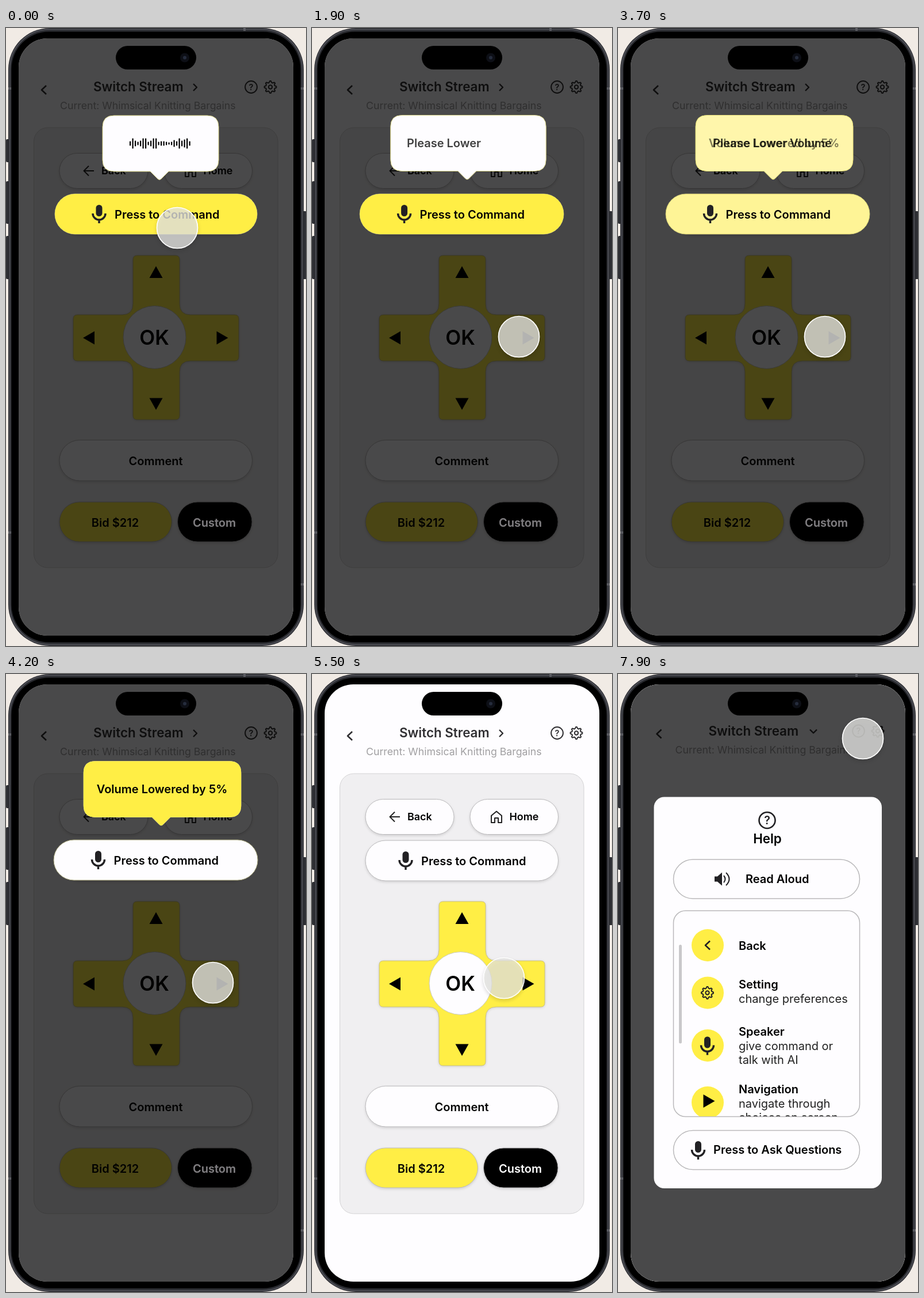
An HTML page that plays this animation: 522 px wide and 1073 px high, repeating every 8000 ms.

```html
<!DOCTYPE html>
<html lang="en">
<head>
<meta charset="utf-8">
<title>Remote control</title>
<style>
  html, body { margin: 0; width: 100%; height: 100%; overflow: hidden; background: #f1ebe5; }
  svg { display: block; width: 522px; height: 1073px; font-family: Inter, sans-serif; }
  .pill { fill: #fefdff; stroke: #bab9bb; filter: drop-shadow(0 2px 2px rgba(0, 0, 0, .13)); }
  .line { fill: none; stroke: currentColor; stroke-width: 2; stroke-linejoin: round; }
  .plain { fill: #fefdff; stroke: #bab9bb; stroke-width: 1.5; }
  #cursor { filter: drop-shadow(0 3px 3px rgba(0, 0, 0, .18)); }
</style>
</head>
<body>
<svg id="stage" viewBox="0 0 522 1073"></svg>
<script>
const YELLOW = '#ffee45', WHITE = '#fefdff', LOOP = 8000, STEP = 100;
const stage = document.getElementById('stage');

const text = (x, y, str, size = 20, weight = 600, more = '') =>
  `<text x="${x}" y="${y}" font-size="${size}" font-weight="${weight}" ${more}>${str}</text>`;
const centered = (x, y, str, size = 20, more = '') =>
  text(x, y, str, size, 600, `text-anchor="middle" ${more}`);
const rect = (l, t, r, b, radius, more = '') =>
  `<rect x="${l}" y="${t}" width="${r - l}" height="${b - t}" rx="${radius}" ${more}/>`;
const pill = (l, t, r, b, more = 'class="pill"') => rect(l, t, r, b, (b - t) / 2, more);
const circle = (x, y, r, more = '') => `<circle cx="${x}" cy="${y}" r="${r}" ${more}/>`;
const path = (d, more = 'class="line"') => `<path d="${d}" ${more}/>`;
const group = (id, body, more = '') => `<g id="${id}" ${more}>${body}</g>`;

function gear(x, y, r) {
  const points = [];
  for (let i = 0; i < 32; i++) {
    const a = (i - .5) * Math.PI / 16;
    const d = i % 4 < 2 ? r : r * .76;
    points.push(`${(x + d * Math.sin(a)).toFixed(1)},${(y - d * Math.cos(a)).toFixed(1)}`);
  }
  return `<polygon class="line" points="${points.join(' ')}"/>` + circle(x, y, r * .3, 'class="line"');
}

const mic = (x, y) =>
  rect(x - 5.5, y - 16, x + 5.5, y + 4, 5.5, 'fill="#222124"') +
  path(`M${x - 11} ${y - 1}a11 11 0 0 0 22 0M${x} ${y + 10}v6`,
    'fill="none" stroke="#222124" stroke-width="3.4"');

const question = (x, y, r) =>
  circle(x, y, r, `class="line" style="stroke-width:${r * .19}"`) +
  centered(x, y + r * .5, '?', r * 1.4, 'fill="currentColor"');

function header(x, y, arrow, iconX) {
  return `<g color="#302f32">
    ${path(`M${x + 10} ${y + 97}l-8 7.5 8 7.5`, 'class="line" style="stroke-width:2.6"')}
    ${text(x + 92, y + 107, 'Switch Stream', 22.4, 600, 'fill="#302f32"')}
    ${path(arrow, 'class="line" style="stroke-width:2.4"')}
    ${text(x + 34, y + 138, 'Current: Whimsical Knitting Bargains', 17.7, 400, 'fill="#a09fa1"')}
    ${question(iconX, y + 99.5, 10.4)}${gear(iconX + 33.5, y + 99.5, 10.5)}
  </g>`;
}

const dpad = () => path(
  'M228 395H295q7 0 7 7V479q0 19 19 19H398q7 0 7 7V571q0 7-7 7H321q-19 0-19 19' +
  'V673q0 7-7 7H228q-7 0-7-7V597q0-19-19-19H124q-7 0-7-7V505q0-7 7-7H202q19 0 19-19V402q0-7 7-7Z',
  `fill="${YELLOW}" stroke="#c9c07a" style="filter:drop-shadow(0 1px 2px rgba(0,0,0,.12))"`) +
  path('M261 413.5l11.5 20.5h-23ZM261 663l11.5-20.5h-23ZM134 538l20-11.5v23ZM386.5 538l-20-11.5v23Z', 'fill="#000"') +
  circle(258.5, 537, 54.5, `fill="${WHITE}" stroke="#c9c9b8"`) +
  centered(258, 549.5, 'OK', 35);

const remote = () => header(60, 3, 'M326 97l6 6-6 6', 426.5) +
  rect(48.5, 173, 473, 937, 24, 'fill="#f0eff1" stroke="#d3d2d4"') +
  pill(93, 217.5, 247, 278.5) + path('M153 248H136M144 239.5l-8.500 8.500 8.500 8.500', 'class="line" color="#222"') +
  text(166, 254.300, 'Back', 17.9) +
  pill(275, 217.5, 428.5, 278.5) +
  path('M312 246l9-7.500 9 7.500v12h-6v-8h-6v8h-6Z', 'class="line" color="#222"') +
  text(343.5, 254.300, 'Home', 17.9) +
  pill(93, 289, 428.5, 359) + mic(163, 324) + text(190, 331.5, 'Press to Command') +
  dpad() +
  pill(93, 715.5, 428.5, 786) + centered(260.5, 758.5, 'Comment') +
  pill(93, 823, 288.5, 892, `class="pill" style="fill:${YELLOW}"`) + centered(190, 865.5, 'Bid $212') +
  pill(298.5, 823, 428, 892, 'class="pill" style="fill:#000"') +
  centered(362.5, 865.5, 'Custom', 20, 'fill="#fff"');

const waveform = () => [4, 9, 5, 3, 5, 9, 9, 3, 5, 9, 9, 3, 4, 4, 3, 2, 3, 6, 4, 9, 5, 7, 9, 4]
  .map((h, i) => rect(215 + i * 4.5, 200.5 - h, 217.2 + i * 4.5, 200.5 + h, 1)).join('');

const command = () => rect(0, 0, 522, 1073, 0, 'fill="#000" opacity=".71"') +
  centered(362.5, 865.5, 'Custom', 20, 'fill="#7d7b7e"') +
  pill(83, 288, 438, 358, `class="key" fill="${WHITE}" stroke="#a9a77c"`) +
  pill(83, 288, 438, 358, `class="key" id="keyYellow" fill="${YELLOW}"`) +
  group('keyLabel', mic(160.5, 323) + text(187.5, 330.7, 'Press to Command')) +
  group('bubble', path('', `class="balloon" fill="${WHITE}" stroke="#dfd98a"`)) +
  path('', `class="balloon" id="balloonYellow" fill="${YELLOW}"`) +
  group('wave', waveform()) +
  text(202.5, 209, '', 24, 600, 'id="dots"') +
  text(165, 207.300, 'Please Lower <tspan id="volume">Volume</tspan>', 20, 600, 'id="please"') +
  centered(271.5, 207.300, 'Volume Lowered by 5%', 20, 'id="lowered"');

function topic(y, icon, title, titleY, ...lines) {
  return circle(156, y, 28, `fill="${YELLOW}"`) + icon + text(210, titleY, title) +
    lines.map((line, i) => text(210, titleY + 24.5 * (i + 1), line, 20, 400, 'fill="#222"')).join('');
}

const help = () => rect(0, 0, 522, 1073, 0, `fill="${WHITE}"`) +
  header(65.5, -.5, 'M334 96.500l6 6 6-6', 418.5) +
  rect(0, 0, 522, 1073, 0, 'fill="#000" opacity=".71"') +
  rect(62.5, 213.5, 459, 893, 18, `fill="${WHITE}"`) +
  `<g color="#222124">${question(259.5, 254, 14)}</g>` + centered(260, 294, 'Help', 22.300) +
  pill(96.5, 322, 420.5, 390, 'class="plain"') +
  path('M168 351.500h5l8-7v23l-8-7h-5Z', 'fill="#222124"') +
  path('M184 350q5 6 0 12M188 345q11 11 0 22', 'class="line" color="#222124"') +
  text(222, 363, 'Read Aloud') +
  rect(96.5, 411, 420.5, 768.5, 21, 'class="plain"') +
  rect(106, 470, 111, 641.5, 2.5, 'fill="#c9c8ca"') +
  `<g clip-path="url(#listClip)" color="#222124">
    ${topic(471, path('M160 463.500l-8 7.500 8 7.500', 'class="line" style="stroke-width:2.600"'), 'Back', 479)}
    ${topic(553.5, gear(155.500, 553.500, 10.500), 'Setting', 546, 'change preferences')}
    ${topic(645, mic(155.500, 645.500), 'Speaker', 628, 'give command or', 'talk with AI')}
    ${topic(744, path('M148.500 730l20 11.500-20 11.500Z', 'fill="#000"'), 'Navigation', 728, 'navigate through', 'choices on screen')}
  </g>` +
  pill(96.5, 792.5, 420.5, 860.5, 'class="plain"') + mic(139.500, 827) +
  text(166, 833.300, 'Press to Ask Questions');

const phone = () => rect(0, 193, 8, 233, 2, 'fill="#2e2f34"') +
  rect(0, 266, 8, 340, 2, 'fill="#2e2f34"') + rect(0, 361, 8, 436, 2, 'fill="#2e2f34"') +
  rect(514, 318, 523, 436, 2, 'fill="#2e2f34"') +
  rect(4, 0, 518, 1073, 72, 'fill="#292a2f"') +
  rect(6.5, 2.5, 515.5, 1070.5, 69, 'fill="none" stroke="#4d4e55" stroke-width="2"') +
  path('M4 105h5M513 105h5M4 876h5M513 966h5M415 0v5', 'stroke="#5a5b61" stroke-width="4"') +
  rect(9.5, 6.5, 512.5, 1066.5, 65, 'fill="#000"') +
  rect(22, 18, 500, 1055, 50, `fill="${WHITE}"`);

stage.innerHTML = `
  <clipPath id="screenClip">${rect(22, 18, 500, 1055, 50)}</clipPath>
  <clipPath id="listClip">${rect(97, 411.5, 420, 768, 20)}</clipPath>
  ${phone()}
  <g clip-path="url(#screenClip)">
    ${remote()}${group('command', command())}${group('help', help())}
  </g>
  ${pill(191, 31, 331, 72, 'fill="#000"')}
  ${circle(311, 51.500, 8, 'fill="#0d0f16"')}${circle(311, 51.500, 3, 'fill="#252c3c"')}
  ${group('cursor', circle(0, 0, 35.500, 'fill="#e6e6e3" fill-opacity=".78"') +
    circle(0, 0, 35.500, 'fill="none" stroke="#fff" stroke-width="1.700"'))}`;

// Each row: time in ms, then the values reached at that time.
const moves = {
  cursor: [[0, 298, 347, 1], [900, 360, 536, 1], [4300, 360, 536, 1], [4900, 329, 343, .55],
    [5200, 326, 328, .55], [5500, 334, 528, .95], [5700, 335, 535, 1], [5900, 335, 535, 1], [6800, 426, 112, 1]],
  balloon: [[0, 168, 370, 152, 267], [900, 170, 372, 151, 269], [1200, 170, 372, 151, 269],
    [2100, 135, 409, 151.5, 270]],
  key: [[1200, 85, 437], [2100, 83, 438]]
};
const fades = {
  command: [[5200, 1], [5500, 0]],
  help: [[6900, 0], [7800, 1]],
  wave: [[200, 1], [900, 0]],
  dots: [[500, 0], [1000, 1], [1200, 1], [1600, 0]],
  please: [[1300, 0], [2100, 1], [3400, 1], [3700, .8], [4200, 0]],
  volume: [[2100, 0], [2500, .13], [3000, 1]],
  lowered: [[3400, 0], [3700, .5], [4200, 1]],
  bubble: [[2100, 1], [2500, .92], [3000, 1]],
  balloonYellow: [[3400, 0], [3700, .45], [4200, 1]],
  keyYellow: [[3400, 1], [3700, .56], [4200, 0]]
};

const linear = p => p;
const easeOut = p => 1 - (1 - p) ** 2;

function valuesAt(rows, t, ease) {
  const next = rows.findIndex(row => row[0] > t);
  if (next < 1) return (next ? rows[rows.length - 1] : rows[0]).slice(1);
  const a = rows[next - 1], b = rows[next];
  const p = ease((t - a[0]) / (b[0] - a[0]));
  return a.slice(1).map((v, i) => v + (b[i + 1] - v) * p);
}

const balloonPath = (l, r, t, tip) => {
  const b = t + 97;
  return `M${l + 20} ${t}H${r - 20}q20 0 20 20V${b - 20}q0 20-20 20H${tip + 16}` +
    `L${tip + 3} ${b + 13}q-3 3-6 0L${tip - 16} ${b}H${l + 20}q-20 0-20-20V${t + 20}q0-20 20-20Z`;
};

const el = id => document.getElementById(id);
const balloons = stage.querySelectorAll('.balloon'), keys = stage.querySelectorAll('.key');

function draw(t) {
  for (const id in fades) {
    const name = id === 'volume' ? 'fill-opacity' : 'opacity';
    el(id).setAttribute(name, valuesAt(fades[id], t, linear)[0]);
  }
  const [x, y, alpha] = valuesAt(moves.cursor, t, easeOut);
  el('cursor').setAttribute('transform', `translate(${x} ${y})`);
  el('cursor').setAttribute('opacity', alpha);

  const outline = balloonPath(...valuesAt(moves.balloon, t, easeOut));
  balloons.forEach(b => b.setAttribute('d', outline));

  const [left, right] = valuesAt(moves.key, t, easeOut);
  keys.forEach(k => {
    k.setAttribute('x', left);
    k.setAttribute('width', right - left);
  });
  el('keyLabel').setAttribute('transform', `translate(${(left - 83) * .75} 0)`);
  el('dots').textContent = t < 1000 ? '.' : t < 1300 ? '..' : '...';
}

const start = performance.now();
function tick() {
  const t = (performance.now() - start) % LOOP;
  draw(Math.floor(t / STEP) * STEP);
  requestAnimationFrame(tick);
}
draw(0);
requestAnimationFrame(tick);
</script>
</body>
</html>
```
